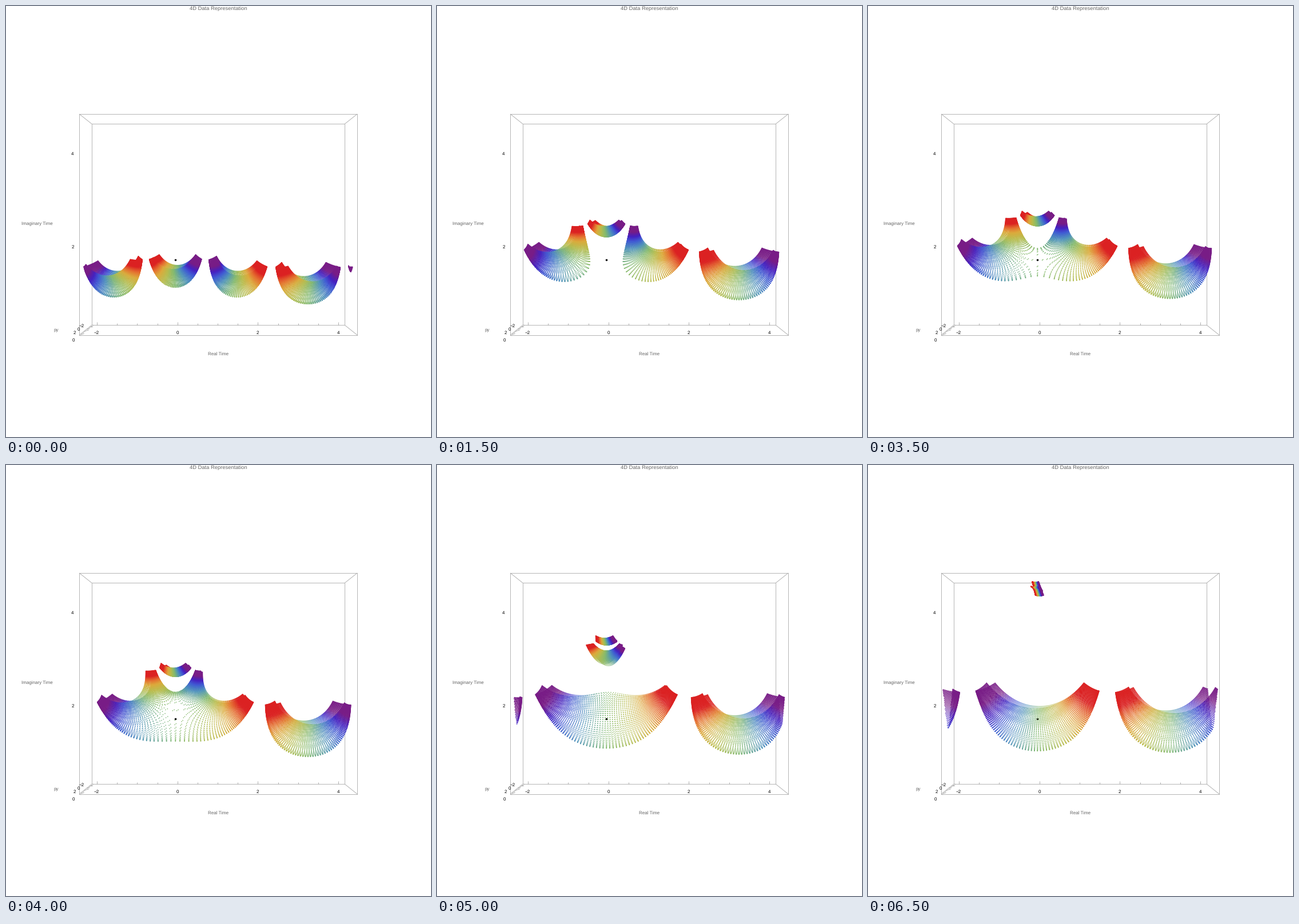
A matplotlib script that plays this animation: 743 by 754 pixels, repeating every 7000 ms.

```python
import numpy as np
import matplotlib.pyplot as plt
from matplotlib.animation import FuncAnimation
from matplotlib.collections import LineCollection
from matplotlib.colors import LinearSegmentedColormap

W, H, DPI = 743, 754, 100
plt.rcParams["font.family"] = "Liberation Sans"
plt.rcParams["text.hinting"] = "none"

# Mixing angle in degrees between the one- and two-cycle parts of the field
ANGLES = [60, 45, 30, 15, 13.9, 12.85, 11.9, 11.2, 9, 5, 4, 2, 1.5, 1]

CX, CY = 371.1, 382.3        # vanishing point in pixels
X0, Z0 = 1.015, 2.5          # data at the middle of the box
BACK, FRONT = 70.35, 77.35   # pixels per unit at py = -3 and py = 3


def scale(py):
    mid = (1 / BACK + 1 / FRONT) / 2
    return 1 / (mid - py / 6 * (1 / BACK - 1 / FRONT))


def project(x, py, z):
    s = scale(py)
    return CX + (x - X0) * s, CY - (z - Z0) * s


rainbow = LinearSegmentedColormap.from_list("rainbow", [
    (0, (.471, .109, .527)), (.14, (.27, .13, .76)), (.25, (.25, .36, .83)),
    (.37, (.31, .58, .73)), (.5, (.513, .730, .441)), (.63, (.72, .74, .30)),
    (.75, (.864, .671, .237)), (.86, (.90, .45, .19)), (1, (.857, .131, .132))])

PX = np.linspace(-5, 5, 101)
PY = np.linspace(0, 3, 31)
py_grid, px_grid = np.meshgrid(PY, PX, indexing="ij")
kappa = np.sqrt(1 + py_grid ** 2)
zeta = np.stack([px_grid + 1j * kappa, px_grid - 1j * kappa], axis=-1)
depth = np.broadcast_to(py_grid[..., None, None], zeta.shape + (2,)).ravel()
momentum = np.broadcast_to(px_grid[..., None, None], zeta.shape + (2,)).ravel()
colors = rainbow(np.clip((momentum + 3.5) / 7, 0, 1))


def saddle_times(deg):
    """Solve a sin t - b sin 2t = zeta for Im t > 0, with u = exp(-it)."""
    a = np.cos(np.radians(deg))
    b = np.sin(np.radians(deg)) / 2
    m = np.zeros(zeta.shape + (4, 4), complex)
    m[..., 1, 0] = m[..., 2, 1] = m[..., 3, 2] = 1
    m[..., 0, 0] = a / b
    m[..., 0, 1] = 2j * zeta / b
    m[..., 0, 2] = -a / b
    m[..., 0, 3] = 1
    u = np.linalg.eigvals(m)
    order = np.argsort(np.abs(u), axis=-1)
    u = np.take_along_axis(u, order, axis=-1)[..., 2:].ravel()
    x = -np.angle(u)
    x = (x - X0 + np.pi) % (2 * np.pi) - np.pi + X0
    return x, np.log(np.abs(u))


fig = plt.figure(figsize=(W / DPI, H / DPI), dpi=DPI, facecolor="white")
ax = fig.add_axes([0, 0, 1, 1])
ax.set_xlim(0, W)
ax.set_ylim(H, 0)
ax.axis("off")


def label(x, y, s, px=8, color="0.4"):
    ax.text(x, y, s, fontsize=px * 72 / DPI, color=color,
            ha="center", va="center")


def draw_box():
    x = np.array([-np.pi, np.pi, np.pi, -np.pi, -np.pi]) + X0
    z = np.array([0, 0, 5, 5, 0])
    back = np.column_stack(project(x, -3, z))
    front = np.column_stack(project(x, 3, z))
    lines = [back, front] + [[p, q] for p, q in zip(back[:4], front[:4])]
    ax.add_collection(LineCollection(lines, colors="0.66", linewidths=.6,
                                     zorder=1))
    ticks = []
    for v in np.arange(-2, 4.1, .5):
        px, py = project(v, -3, 0)
        ticks.append([(px, py), (px, py - (5 if v % 2 == 0 else 3))])
    for v in np.arange(-3, 3.1, .5):
        px, py = project(X0 - np.pi, v, 0)
        ticks.append([(px, py), (px + (4 if v % 2 == 0 else 2.5), py)])
    ax.add_collection(LineCollection(ticks, colors="0.6", linewidths=.55,
                                     zorder=1))


draw_box()
label(371, 5.3, "4D Data Representation", 9.35)
label(371, 608.5, "Real Time")
label(54.5, 381, "Imaginary Time")
label(88, 566, "py")
for lx, ly, s in [(116.5, 258.5, "4"), (116.5, 422, "2"), (117.5, 584.5, "0"),
                  (132, 560, "−2"), (127, 565.5, "0"), (119.5, 571.5, "2"),
                  (158.5, 571.5, "−2"), (299.5, 571.5, "0"),
                  (440, 571.5, "2"), (581, 571.5, "4")]:
    label(lx, ly, s, 8, "black")


def cloud(rows, zorder):
    dots = ax.scatter(np.zeros(len(rows)), np.zeros(len(rows)), s=1.35,
                      c=colors[rows], linewidths=0, zorder=zorder)
    return dots, rows


far_rows = np.arange(len(depth))[::-1]
near_rows = np.flatnonzero(depth > 0)
far, _ = cloud(far_rows, 2)
near, _ = cloud(near_rows, 4)
dot_x, dot_y = project(0, 0, 1.656)
ax.scatter([dot_x], [dot_y], s=6.5, c="black", linewidths=0, zorder=3)


def update(i):
    x, z = saddle_times(ANGLES[i])
    for dots, rows, side in ((far, far_rows, -1), (near, near_rows, 1)):
        pos = project(x[rows], side * depth[rows], z[rows])
        dots.set_offsets(np.column_stack(pos))
    return far, near


anim = FuncAnimation(fig, update, frames=len(ANGLES), interval=500,
                     repeat=True, repeat_delay=0, blit=False)
plt.show()
```
